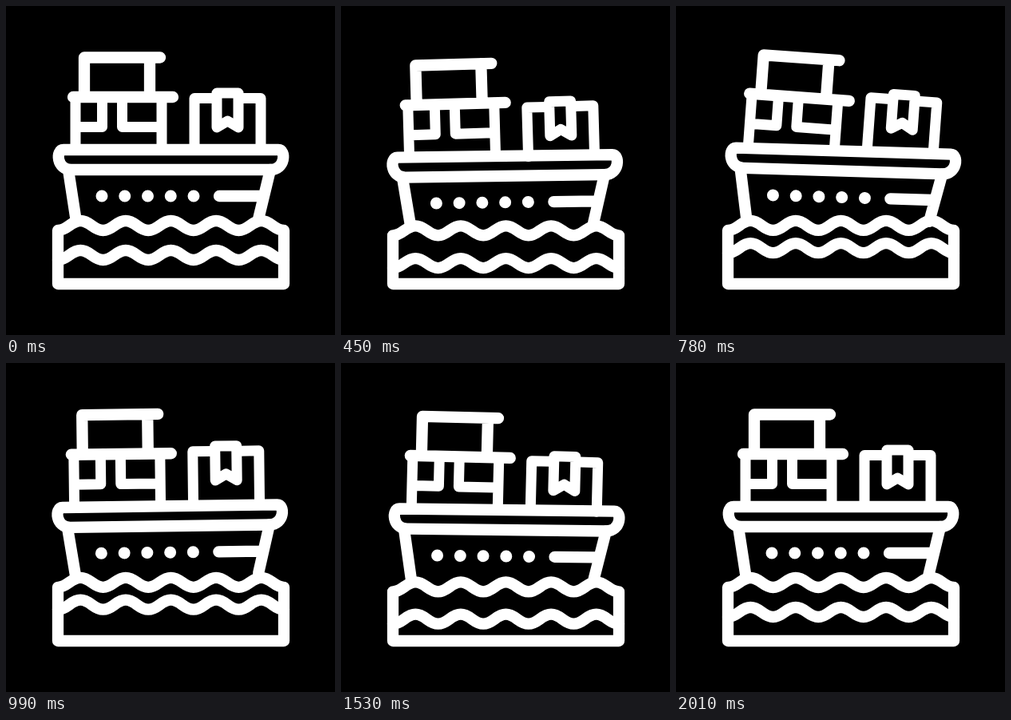
An HTML page for the animation above (2250 ms loop, 412 px wide and 412 px high).

```html
<!DOCTYPE html>
<html lang="en">
<head>
<meta charset="utf-8">
<title>Cargo ship</title>
<style>
html, body { margin: 0; height: 100%; overflow: hidden; background: #000; }
svg { display: block; width: 100vw; height: 100vh; }
path { fill: none; stroke: #fff; stroke-width: 14.3; stroke-linecap: round; stroke-linejoin: round; }
.thin { stroke-width: 13; }
.dots { stroke-width: 15; stroke-dasharray: 0 28.75; }
</style>
</head>
<body>
<svg viewBox="0 0 412 412">
  <g id="ship">
    <g id="crates">
      <path d="M98 64.5H193M98 64.5V110M180 64.5V110M84 114H209"/>
      <path class="thin" d="M87 114V177M195 114V177M90 151.5H120.5V116M192 151.5H145.5V116"/>
    </g>
    <g id="parcel">
      <path class="thin" d="M236 177V115.5H260M295 115.5H319V177"/>
      <path class="thin" d="M264 109V152L277.5 144L291 152V109Z"/>
    </g>
    <path d="M72 180H341C351 180 350 205 331 205H82C63 205 62 180 72 180Z"/>
    <path d="M78 205L87.5 267M331 205L316.5 265M267 238H319"/>
    <path class="dots" d="M120 238H236"/>
  </g>
  <path id="sea"/>
  <path id="swell"/>
</svg>
<script>
const LOOP = 2250, END = 2010, STEP = 30;
const el = id => document.getElementById(id);
const ease = (a, b, p) => a + (b - a) * (1 - Math.cos(Math.PI * p)) / 2;

// Leaves rest, turns at evenly spaced times on alternating sides of mid, returns to rest.
function swing(t, { first, gap, turns, amp, mid = 0, decay = 1 }) {
  const peak = i => i < 0 || i >= turns ? 0 : mid + amp * (-decay) ** i;
  const time = i => i < 0 ? 0 : i >= turns ? END : first + gap * i;
  let i = 0;
  while (i < turns && t > time(i)) i++;
  return ease(peak(i - 1), peak(i), (t - time(i - 1)) / (time(i) - time(i - 1)));
}

const roll = { first: 230, gap: 490, turns: 4, amp: -2.3, mid: -.4 };
const sway = { first: 260, gap: 490, turns: 4, amp: -2.5 };
const bob = { first: 470, gap: 480, turns: 3, amp: 5.5, mid: 2.4, decay: .6 };
const hop = { first: 470, gap: 480, turns: 3, amp: 3.5 };
const surface = { first: 420, gap: 470, turns: 3, amp: 3.7, mid: 2.7 };
const tide = { first: 420, gap: 470, turns: 3, amp: 11, mid: -.7 };

// Five crests from x = 65 to x = 348, starting in a trough.
const wave = y => `65 ${y}` + 'c12 0 16.3 -12 28.3 -12s16.3 12 28.3 12'.repeat(5);

function draw() {
  const now = (performance.now() - start) % LOOP;
  const t = Math.min(END, Math.floor(now / STEP) * STEP);
  const tilt = swing(t, sway);
  const place = (id, y, angle, pivot) =>
    el(id).setAttribute('transform', `translate(0 ${y}) rotate(${angle} ${pivot})`);
  place('ship', swing(t, bob), swing(t, roll), '206 285');
  place('crates', 0, tilt, '141 180');
  place('parcel', swing(t, hop), tilt, '278 180');
  el('sea').setAttribute('d', `M65 348L${wave(281 + swing(t, surface))}V348Z`);
  el('swell').setAttribute('d', `M${wave(318 + swing(t, tide))}`);
  requestAnimationFrame(draw);
}
const start = performance.now();
draw();
</script>
</body>
</html>
```
